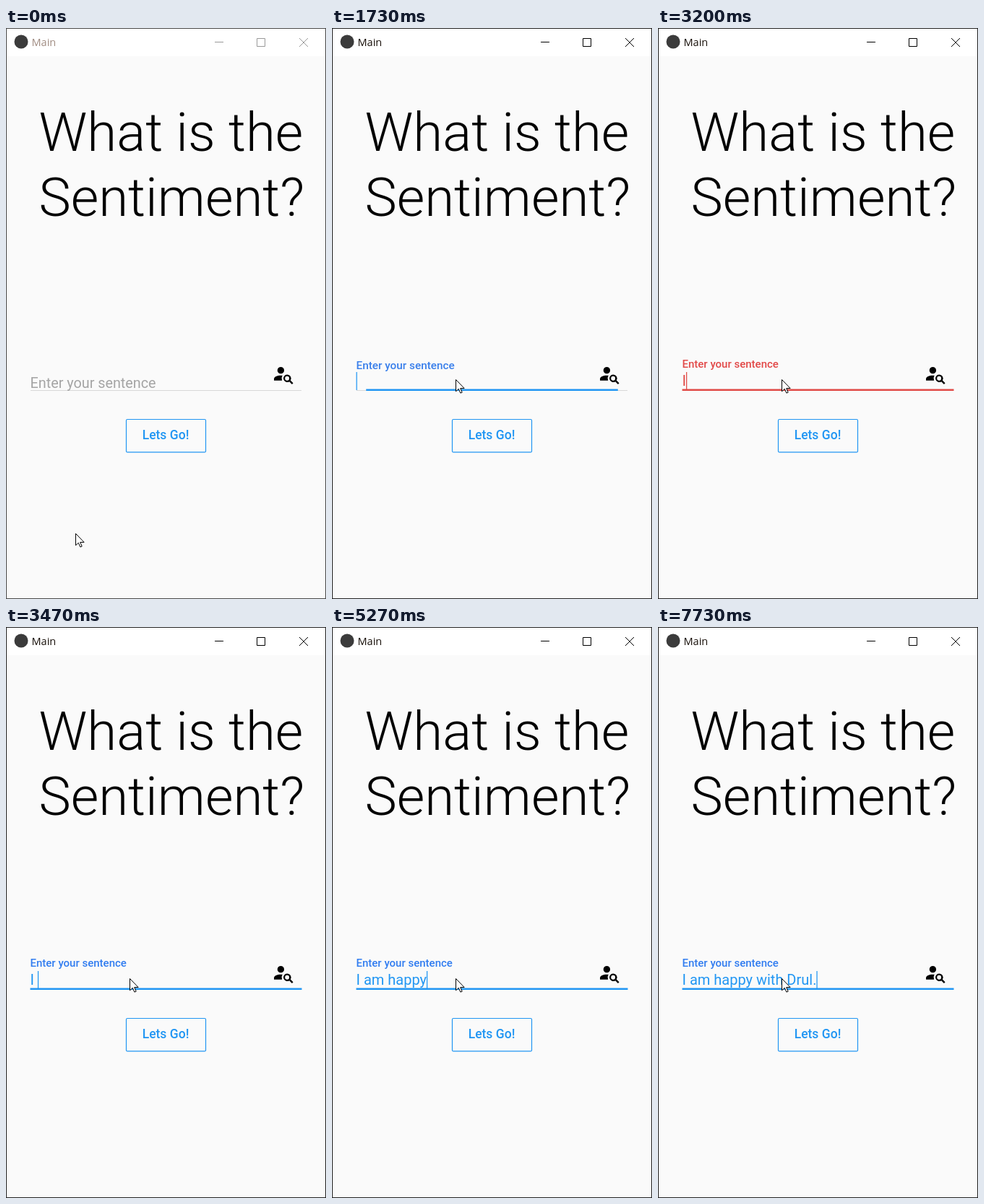
Animation, 443 px wide and 790 px high, one loop 8 s. Source, as an HTML page with a canvas:

```html
<!DOCTYPE html>
<html lang="en">
<head>
<meta charset="utf-8">
<title>Main</title>
<style>
  html, body { margin: 0; width: 100%; height: 100%; overflow: hidden; background: #fafafa; }
  canvas { display: block; }
</style>
</head>
<body>
<canvas id="stage" width="443" height="790"></canvas>
<script>
const ctx = document.getElementById('stage').getContext('2d');
const LOOP = 8000, FPS = 15;
const BLUE = [33, 150, 243], LABEL_BLUE = [48, 124, 240], RED = [244, 67, 54], GREY = [165, 165, 165];
const FIELD = { left: 33.5, right: 409.5, baseline: 495 };
const HINT = 'Enter your sentence';

// Each entry: time in ms and the text in the field from then on.
const typing = [
  [0, ''], [2530, 'I'], [2930, ''], [3200, 'I'], [3470, 'I '],
  [3730, 'I a'], [3930, 'I am '], [4670, 'I am h'], [4730, 'I am ha'],
  [4870, 'I am hap'], [5070, 'I am happ'], [5270, 'I am happy'],
  [5400, 'I am happy '], [5530, 'I am happy w'], [5730, 'I am happy wi'],
  [5930, 'I am happy wit'], [6070, 'I am happy with'], [6130, 'I am happy with '],
  [6530, 'I am happy with D'], [6930, 'I am happy with Dr'],
  [7070, 'I am happy with Dru'], [7270, 'I am happy with Drul'],
  [7730, 'I am happy with Drul.']
];

const personSearch = new Path2D(
  'M10 4a4 4 0 1 0 0 8a4 4 0 1 0 0-8z' +
  'M10 14C5.6 14 2 15.8 2 18v2h9.5a6.5 6.5 0 0 1 .45-5.86Q11 14 10 14z' +
  'M17.5 13a4.5 4.5 0 1 0 2.57 8.26l3.2 3.18L24.7 23l-3.2-3.17A4.5 4.5 0 0 0 17.5 13z' +
  'M17.5 15a2.5 2.5 0 1 1 0 5a2.5 2.5 0 1 1 0-5z');
const arrow = new Path2D('M0 0V16.3L3.8 12.8L6.4 18.6L8.7 17.6L6.2 12H11.6Z');

const clamp = v => Math.max(0, Math.min(1, v));
const ramp = (t, start, length) => clamp((t - start) / length);
const lerp = (a, b, p) => a + (b - a) * p;
const mix = (a, b, p) => a.map((v, i) => lerp(v, b[i], p));
const rgb = c => `rgb(${c.map(Math.round).join(',')})`;
const bezier = (a, b, c, d, u) => {
  const v = 1 - u;
  return v * v * v * a + 3 * v * v * u * b + 3 * v * u * u * c + u * u * u * d;
};

function rect(x, y, w, h, color) {
  ctx.fillStyle = color;
  ctx.fillRect(x, y, w, h);
}

function text(str, x, y, font, color, align = 'left') {
  ctx.font = font;
  ctx.fillStyle = color;
  ctx.textAlign = align;
  ctx.fillText(str, x, y);
}

const roboto = (size, weight = 400) => `${weight} ${size}px Roboto, sans-serif`;

function drawWindow(active) {
  rect(0, 0, 443, 790, active ? '#222' : '#484848');
  rect(1, 1, 441, 788, '#fafafa');
  rect(1, 1, 441, 38, '#fff');

  ctx.fillStyle = '#3b3b3b';
  ctx.beginPath();
  ctx.arc(21, 19, 9.5, 0, Math.PI * 2);
  ctx.fill();
  text('Main', 35.5, 25, '14.5px "Open Sans", sans-serif', active ? '#18100a' : '#a08c82');

  ctx.strokeStyle = active ? '#000' : '#999';
  ctx.lineWidth = 1;
  ctx.beginPath();
  ctx.moveTo(289, 19.5);
  ctx.lineTo(301, 19.5);
  ctx.rect(347.5, 14.5, 11, 11);
  ctx.moveTo(406, 14);
  ctx.lineTo(418, 26);
  ctx.moveTo(418, 14);
  ctx.lineTo(406, 26);
  ctx.stroke();
}

function drawPage() {
  text('What is the', 45.5, 170, roboto(74.5, 300), '#000');
  text('Sentiment?', 45.5, 259.5, roboto(74.5, 300), '#000');

  ctx.save();
  ctx.translate(368.7, 464.3);
  ctx.scale(1.17, 1.17);
  ctx.fillStyle = '#000';
  ctx.fill(personSearch, 'evenodd');
  ctx.restore();

  ctx.strokeStyle = rgb(BLUE);
  ctx.lineWidth = 1.2;
  ctx.beginPath();
  ctx.roundRect(166.5, 541.5, 110, 45.4, 1.5);
  ctx.stroke();
  text('Lets Go!', 221, 569, roboto(17.5, 500), rgb(BLUE), 'center');
}

function drawField(t) {
  const linear = ramp(t, 1584, 200);
  const focus = 1 - (1 - linear) ** 2;
  const error = ramp(t, 2890, 200) * (1 - ramp(t, 3180, 220));
  const accent = rgb(mix(BLUE, RED, error));
  const hint = mix(GREY, mix(LABEL_BLUE, RED, error), focus);

  rect(34, 501, 375, 1, '#d8d8d8');
  text(HINT, FIELD.left, lerp(498, 469.7, focus),
       roboto(lerp(19.8, 15, focus), focus ? 500 : 400), rgb(hint));
  if (!focus) return;

  const center = (FIELD.left + FIELD.right) / 2;
  const half = (FIELD.right - FIELD.left) / 2 * focus;
  rect(center - half, 499.5, half * 2, 2.5, accent);

  const value = typing.findLast(([time]) => t >= time)[1];
  text(value, FIELD.left, FIELD.baseline, roboto(20), accent);
  const blinkedOff = (t >= 2130 && t < 2530) || (t >= 4470 && t < 4670);
  if (!blinkedOff) {
    rect(FIELD.left + ctx.measureText(value).width, 476, 1.25, 25, accent);
  }
}

function drawPointer(t) {
  const p = ramp(t, 0, 667);
  const u = p * p * (3 - 2 * p);
  ctx.save();
  ctx.translate(Math.round(bezier(96, 82, 150, 171, u)) + 0.5,
                Math.round(bezier(699, 660, 560, 486, u)) + 0.5);
  ctx.fillStyle = '#fff';
  ctx.fill(arrow);
  ctx.strokeStyle = '#000';
  ctx.lineWidth = 1;
  ctx.stroke(arrow);
  ctx.restore();
}

function draw(now) {
  // Hold each picture for one tick, with ticks rounded to 10 ms.
  const tick = Math.floor((now % LOOP + 4) * FPS / 1000);
  const t = Math.round(tick * 100 / FPS) * 10 % LOOP;
  drawWindow(t >= 870);
  drawPage();
  drawField(t);
  drawPointer(t);
}

let start;
function frame() {
  const now = performance.now();
  start ??= now;
  draw(now - start);
  requestAnimationFrame(frame);
}
frame();
</script>
</body>
</html>
```
